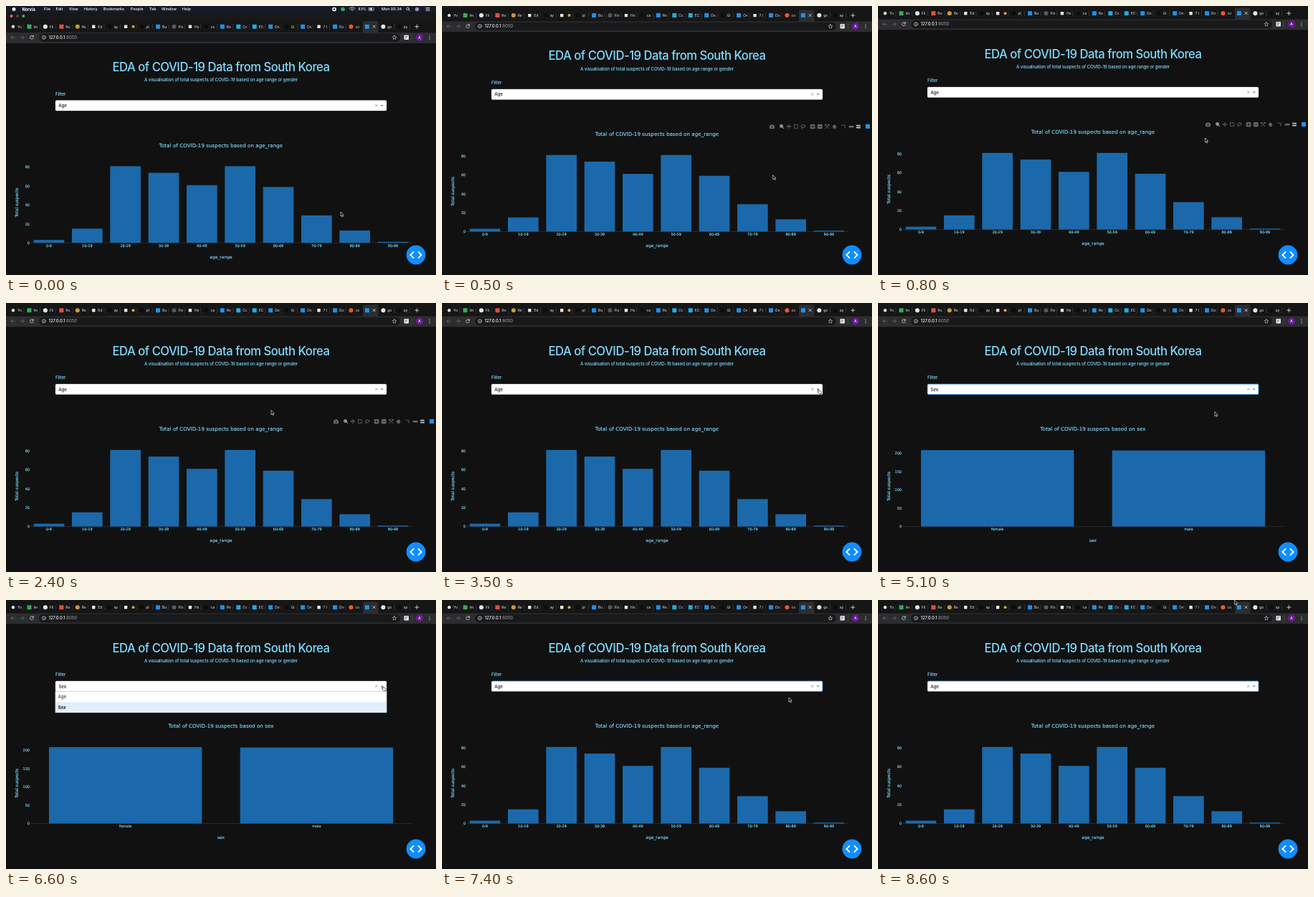
An HTML page that plays this animation: 600x375 px, repeating every 8.7 s.

```html
<!DOCTYPE html>
<html lang="en">
<head>
<meta charset="utf-8">
<title>Dashboard demo</title>
<style>
  html, body { margin: 0; width: 100%; height: 100%; overflow: hidden; background: #111; }
  svg { display: block; width: 600px; height: 375px; }
  text { font-family: Inter, "Liberation Sans", sans-serif; font-weight: 500; white-space: pre; }
  .plot text { font-family: "DejaVu Sans", Verdana, sans-serif; font-weight: 400; fill: #7fdbff; stroke: #7fdbff; stroke-width: .14; }
  .line { fill: none; stroke-linecap: round; stroke-linejoin: round; }
  .mid { text-anchor: middle; }
  .end { text-anchor: end; }
</style>
</head>
<body>
<svg id="stage" viewBox="0 0 600 375">
  <rect width="600" height="375" fill="#111"/>

  <!-- everything that slides with the menu bar -->
  <g id="screen">
    <g id="menubar">
      <rect y="-18.5" width="600" height="9.5" fill="#141b29"/>
      <rect y="-9" width="600" height="9.5" fill="#18181a"/>
      <circle cx="11" cy="-14" r="2.5" fill="#eee"/>
      <circle cx="7.5" cy="-4.6" r="2" fill="#fc5b57"/>
      <circle cx="16" cy="-4.6" r="2" fill="#4a4b4e"/>
      <circle cx="24.3" cy="-4.6" r="2" fill="#33c748"/>
      <circle cx="458" cy="-14" r="2.1" fill="#222" stroke="#fff" stroke-width="1.5"/>
      <circle cx="470" cy="-14" r="2.8" fill="#36a852"/>
      <g class="line" stroke="#eee" stroke-width=".8">
        <path d="M479 -15.2q4 -3.4 8 0M480.5 -13.6q2.5 -2.2 5 0M482.6 -12.1h.8"/>
        <rect x="506" y="-16" width="7" height="3.8" rx=".8" stroke-width=".6"/>
        <path d="M507.3 -14.1h3.6" stroke-width="2.2" stroke-linecap="butt"/>
        <circle cx="560.5" cy="-14.6" r="1.8"/><path d="M562 -13l1.5 1.5"/>
        <path d="M586 -16h5M586 -14.1h5M586 -12.2h5"/>
      </g>
      <circle cx="573.5" cy="-14" r="2.7" fill="#a58cc8"/>
    </g>

    <g id="tabs">
      <rect width="600" height="19.5" fill="#161617"/>
      <path d="M496 19.5q2 0 2 -2V4.5q0 -2 2 -2h17.5q2 0 2 2v13q0 2 2 2z" fill="#2c2d2f"/>
      <path class="line" d="M512 8.5l3.2 3.2m0 -3.2l-3.2 3.2M570.8 10.2h5M573.3 7.7v5" stroke="#e8eaed" stroke-width=".8"/>
    </g>

    <rect y="18.5" width="600" height="15" fill="#2c2d2f"/>
    <rect x="46" y="19.8" width="504" height="11.4" rx="5.7" fill="#18191a"/>
    <g class="line" stroke="#d4d6d9" stroke-width=".8">
      <path d="M12 25.3h-5m2.2 -2.3l-2.3 2.3l2.3 2.3M20 25.3h5m-2.2 -2.3l2.3 2.3l-2.3 2.3" stroke="#6c6e72"/>
      <path d="M38 23.8a2.4 2.4 0 1 0 .3 2.2M38.3 22.6v1.7h-1.7"/>
      <circle cx="52.8" cy="25.3" r="2.5" stroke-width=".7"/>
      <path d="M52.8 25v1.5M52.8 23.8v.1" stroke-width=".7"/>
      <path d="M542 22.5l.8 1.8l2 .2l-1.5 1.4l.4 2l-1.7 -1l-1.7 1l.4 -2l-1.5 -1.4l2 -.2z" stroke-width=".6"/>
      <path d="M566.5 21.5v8" stroke="#505256" stroke-width=".6"/>
      <path d="M591 23v.1M591 25.3v.1M591 27.6v.1" stroke-width="1.2"/>
    </g>
    <rect x="555.5" y="22" width="6.5" height="6.5" rx=".8" fill="#e4e5e7"/>
    <path d="M557 24h3.5M557 26h2" stroke="#505256" stroke-width=".8"/>
    <circle cx="577" cy="25.3" r="5" fill="#6a1b9a"/>

    <g id="page">
      <rect y="33.5" width="600" height="342" fill="#111"/>
    </g>

    <g id="plot" class="plot">
      <path d="M33.3 311.6H566.7" stroke="#33373b" stroke-width=".6"/>
      <g id="age"></g>
      <g id="sex"></g>
    </g>

    <g id="modebar" class="line" stroke="#6c6c6c" stroke-width=".9">
      <path d="M457.8 163.8h1.3l.6 -1h1.8l.6 1h1.3v4h-5.6z" fill="#6c6c6c"/>
      <circle cx="460.6" cy="165.6" r="1" fill="#111" stroke="none"/>
      <g stroke="#c4c4c4"><circle cx="473.5" cy="164.5" r="2"/><path d="M475 166l1.8 1.8M472.6 164.5h1.8M473.5 163.6v1.8"/></g>
      <path d="M481.3 165h5.4M484 162.3v5.4M481.3 165l.8 -.8M481.3 165l.8 .8M486.7 165l-.8 -.8M486.7 165l-.8 .8"/>
      <rect x="491.5" y="162.5" width="5.2" height="5.2" stroke-dasharray="1 1.2"/>
      <path d="M502.5 166.5q-2.4 -1.5 0 -3.2q3 -1.3 4.4 .4q.6 2 -2 2.5q-2 .6 -2.6 .2q-.8 1 .3 1.8"/>
      <rect x="514.5" y="162.5" width="5.4" height="5.4" fill="#6c6c6c"/>
      <rect x="524.7" y="162.5" width="5.4" height="5.4" fill="#6c6c6c"/>
      <path d="M515.7 165.2h3M517.2 163.7v3M525.9 165.2h3" stroke="#111"/>
      <path d="M534.8 162.5l5.4 5.4M540.2 162.5l-5.4 5.4M534.8 164v-1.5h1.5M540.2 164v-1.5h-1.5"/>
      <path d="M545 165.2l2.6 -2.5l2.6 2.5M546 165.4v2.3h1v-1.5h1.2v1.5h1v-2.3" fill="#6c6c6c"/>
      <path d="M558 163.2h4v4" stroke-dasharray="2 1"/>
      <path d="M568.8 165.3h4.4" stroke-width="2.6"/>
      <path d="M578.8 163.7h4.4M578.8 166.6h4.4" stroke="#c4c4c4" stroke-width="1.8"/>
      <rect x="591" y="162" width="6" height="6" fill="#2b8fe0" stroke="none"/>
    </g>

    <g id="select">
      <rect id="box" x="69" y="113" width="462" height="14.5" rx="1.6" fill="#fff"/>
      <path class="line" d="M515.4 118.8l2.8 2.8m0 -2.8l-2.8 2.8" stroke="#888" stroke-width=".7"/>
      <path id="arrow" fill="#777"/>
      <g id="menu">
        <rect x="68.9" y="127.4" width="462.2" height="29.6" fill="#fff" stroke="#ccc" stroke-width=".4"/>
        <rect id="hover" x="69.1" width="461.8" height="14.6" fill="#e0edfb"/>
      </g>
    </g>
  </g>

  <circle cx="572" cy="347" r="13.4" fill="#118dff"/>
  <path class="line" d="M568.6 342.8l-4.2 4.2l4.2 4.2M575.4 342.8l4.2 4.2l-4.2 4.2" stroke="#fff" stroke-width="1.8"/>

  <g id="cursor">
    <path id="pointer" d="M0 0V6L1.4 4.8L2.4 7L3.4 6.6L2.4 4.4H4.2Z" fill="#000" stroke="#fff" stroke-width=".6"/>
    <path id="hand" d="M-.6 .6q.6 -1 1.2 0l.5 1.7q1.7 -.3 2.8 .7q.9 1.5 .3 3.4h-3q-1.3 -1.3 -2.2 -2.8q.2 -.8 1.2 0z" fill="#fff" stroke="#000" stroke-width=".6"/>
  </g>
</svg>

<script>
const NS = "http://www.w3.org/2000/svg";
const $ = id => document.getElementById(id);

function add(parent, tag, attrs) {
  const el = document.createElementNS(NS, tag);
  for (const k in attrs) el.setAttribute(k, attrs[k]);
  return parent.appendChild(el);
}

// y is the middle of the capital letters
function label(parent, x, y, size, str, attrs = {}) {
  const el = add(parent, "text", { x, y: y + size * 0.36, "font-size": size, ...attrs });
  el.textContent = str;
  return el;
}

// Menu bar
const menuText = { fill: "#fff" };
label($("menubar"), 22.5, -14, 5.6, "Norvia", { ...menuText, style: "font-weight:700" });
[[53, "File"], [69.5, "Edit"], [88, "View"], [109, "History"], [136, "Bookmarks"], [174, "People"],
 [200, "Tab"], [217, "Window"], [246, "Help"], [524, "Mon 00.34"]]
  .forEach(([x, s]) => label($("menubar"), x, -14, 5.4, s, menuText));
label($("menubar"), 491.5, -14, 5, "83%", menuText);

// Tabs: label, icon colour, round icon
const BLUE = "#2090e8", PALE = "#e6e6e6", SKY = "#25a9dd", DARK = "#0c0d0e";
const tabs = [
  ["Yo", PALE, 1], ["Im", "#3aa757"], ["Fli", "#d8eef0", 1], ["Re", "#d9523c"], ["Re", "#c99a3c", 1],
  ["Ed", PALE], ["ay", DARK, 1], ["", PALE], ["pl", DARK, 1], ["Bu", BLUE], ["Flo", "#55575b", 1],
  ["Ho", PALE], ["ca", DARK, 1], ["Re", BLUE], ["Cc", SKY], ["EC", SKY], ["Do", BLUE], ["Gi", DARK, 1],
  ["Ov", BLUE], ["7 I", PALE], ["Do", BLUE], ["co", "#f0562a", 1], ["", BLUE], ["go", "#e9e3dc", 1], ["ay", DARK, 1]
];
tabs.forEach(([name, fill, round], i) => {
  const x = 10 + 22.45 * i, g = $("tabs");
  const r = fill === PALE ? 2.2 : 3;
  add(g, "rect", { x: x - r, y: 10.2 - r, width: 2 * r, height: 2 * r, rx: round ? r : 0.6, fill });
  label(g, x + 6, 10.2, 5, name, { fill: "#c3c5c9", "letter-spacing": -0.1 });
  if (i !== 21 && i !== 22) add(g, "rect", { x: x + 14.6, y: 6.5, width: 0.5, height: 7.5, fill: "#48494d" });
});
add($("tabs"), "circle", { cx: 177.5, cy: 10.2, r: 2, fill: "#d9a63c" });

// Address
const url = label($("screen"), 59.5, 25.3, 5.9, "127.0.0.1", { fill: "#f4f5f6" });
add(url, "tspan", { fill: "#8f9296" }).textContent = ":8050";
label($("screen"), 577, 25.3, 4.8, "A", { fill: "#fff", class: "mid" });

// Page header
const cyan = { fill: "#7fdbff" };
label($("page"), 300, 66.6, 16.67, "EDA of COVID-19 Data from South Korea", { ...cyan, class: "mid", "letter-spacing": -0.49 });
label($("page"), 300, 84.5, 6.25, "A visualisation of total suspects of COVID-19 based on age range or gender",
  { ...cyan, class: "mid", "letter-spacing": -0.145 });
label($("page"), 69, 104.2, 6.25, "Filter", { ...cyan, "letter-spacing": -0.13 });

// Charts
const BASE = 311.6, LEFT = 33.3, WIDTH = 533.4;
function chart(g, name, names, values, scale, step, ticks) {
  const band = WIDTH / names.length, wide = { class: "mid", "letter-spacing": 0.06 };
  values.forEach((v, i) => {
    const x = LEFT + band * i;
    add(g, "rect", { x: x + band * 0.1, y: BASE - v * scale, width: band * 0.8, height: v * scale, fill: "#1b69aa" });
    label(g, x + band / 2, 315.3, 5, names[i], { class: "mid" });
  });
  for (let i = 0; i < ticks; i++)
    label(g, 33, BASE - i * step * scale, 5, i * step, { class: "end" });
  label(g, 300, 175.8, 7.08, "Total of COVID-19 suspects based on " + name, wide);
  label(g, 300, 331.2, 5.83, name, wide);
}
const ages = Array.from({ length: 10 }, (_, i) => `${i * 10}-${i * 10 + 9}`);
chart($("age"), "age_range", ages, [3, 15, 81, 74, 61, 81, 59, 29, 13, 1], 1.318, 20, 5);
chart($("sex"), "sex", ["female", "male"], [208, 207], 0.512, 50, 5);
label($("plot"), 0, 0, 5.83, "Total suspects", { class: "mid", transform: "translate(15.3 255.5) rotate(-90)" });

// Dropdown
const ink = { fill: "#222", "letter-spacing": -0.1 };
const value = label($("select"), 73.3, 120.3, 6.25, "Age", ink);
const options = ["Age", "Sex"].map((s, i) => label($("menu"), 72.6, 134.9 + 14.8 * i, 6.25, s, ink));

// Motion: the hand rests, then moves on with a soft start and stop. [ms, x, y]
const path = [
  [0, 467, 287], [200, 467, 287], [800, 456.5, 184], [1200, 456.5, 184], [2300, 370, 149.5], [2500, 370, 149.5],
  [3300, 525, 120], [3700, 525, 120], [4300, 476.7, 139], [4600, 470, 151.5], [5200, 470, 151.5],
  [6200, 525.5, 120], [6600, 525.5, 120], [7100, 484, 136], [7400, 484, 136], [8500, 497.5, 0.2], [8700, 497.5, 0.2]
];
const slide = [[0, 18.5], [200, 18.5], [600, 0], [8700, 0]];
const OPEN_1 = 3600, PICK_SEX = 4700, OPEN_2 = 6500, PICK_AGE = 7300;

function at(keys, t, col = 1) {
  const i = Math.max(1, keys.findIndex(k => k[0] >= t));
  const a = keys[i - 1], b = keys[i];
  const u = (t - a[0]) / (b[0] - a[0]);
  return a[col] + (b[col] - a[col]) * u * u * (3 - 2 * u);
}
const within = (t, a, b) => t >= a && t < b;
const show = (id, on) => $(id).setAttribute("visibility", on ? "visible" : "hidden");

function draw(t) {
  const x = at(path, t), y = at(path, t, 2);
  const sex = within(t, PICK_SEX, PICK_AGE);
  const open = within(t, OPEN_1, PICK_SEX) || within(t, OPEN_2, PICK_AGE);
  const focus = t >= OPEN_1 && !open;
  const pick = open && y > 127.4 ? +(y > 142.2) : +sex;

  $("screen").setAttribute("transform", `translate(0 ${at(slide, t)})`);
  $("cursor").setAttribute("transform", `translate(${x} ${y})`);
  const overArrow = x > 519 && y > 113 && y < 127;
  show("hand", overArrow);
  show("pointer", !overArrow);

  show("age", !sex);
  show("sex", sex);
  show("modebar", within(t, 300, 2900));
  show("menu", open);
  value.textContent = sex ? "Sex" : "Age";
  options.forEach((o, i) => o.style.fontWeight = i === +sex ? 700 : 400);
  $("hover").setAttribute("y", 127.7 + 14.7 * pick);
  $("arrow").setAttribute("d", open ? "M522.6 121.4h4l-2 -2z" : "M522.6 119.4h4l-2 2z");
  $("box").setAttribute("stroke", focus ? "#2686e6" : "#ccc");
  $("box").setAttribute("stroke-width", focus ? 0.8 : 0.3);
}

const start = performance.now();
function tick() {
  const t = Math.max(0, performance.now() - start) % 8700;
  draw(Math.floor(t / 100) * 100);
  requestAnimationFrame(tick);
}
tick();
</script>
</body>
</html>
```
